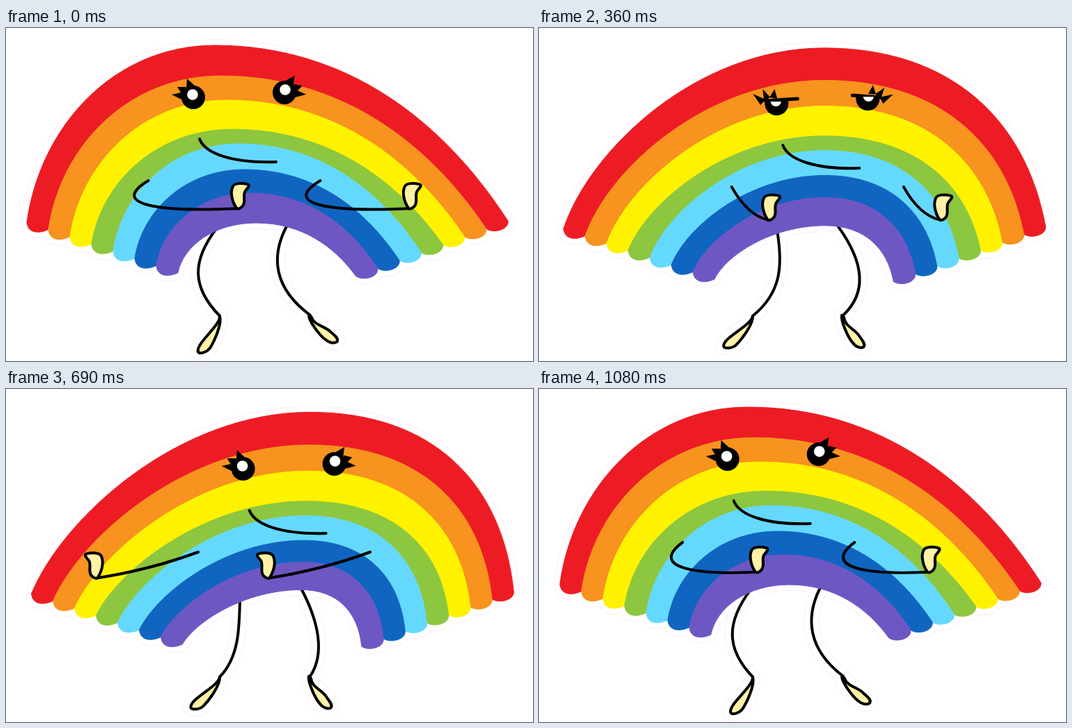
Animation, 757 px wide and 480 px high, one loop 1110 ms. Source, as an HTML page with a canvas:

```html
<!DOCTYPE html>
<html lang="en">
<head>
<meta charset="utf-8">
<title>Dancing rainbow</title>
<style>
  html, body { margin: 0; width: 100%; height: 100%; overflow: hidden; background: #fff; }
  canvas { display: block; width: 757px; height: 480px; }
</style>
</head>
<body>
<canvas id="stage" width="757" height="480"></canvas>
<script>
const ctx = document.getElementById('stage').getContext('2d');
const LOOP = 1110, STEP = 30;
const COLORS = ['#ed1c24', '#f7931e', '#fff200', '#8dc63f', '#65d9fd', '#1065c0', '#6e57c3'];
const CREAM = '#fff2a6';

// Depth of each band edge below the top of the arch
const DEPTH = [0, 44, 79, 121, 142, 179, 213, 256];

// Arm swing: time, sideways reach of the hand, sideways bend of the elbow
const ARM = [
  [0, 127, -88], [210, 181, 0], [360, 52, -2], [570, -150, 0],
  [690, -145, 2], [840, -63, 80], [1080, 105, -72]
];
const FULL_REACH = 181;

const HAND = new Path2D('M0 0C-6-8-10-22-6-31C-4-37 8-37 15-35C20-34 16-30 12-25C8-18 14-9 8-3C5 0 2 1 0 0Z');
const FOOT_L = new Path2D('M0 0C-2 14-41 30-42 43C-41 48-30 47-24 42C-16 34 1 12 0 0Z');
const FOOT_R = new Path2D('M-1 0C-3 8 8 32 14 39C19 46 26 48 30 46C34 42 28 36 24 30C18 20 3 16 2 3Z');
const LASHES = new Path2D('M9-27L10-13L-2-17ZM23-15L16-4L10-15ZM31-4L17 3L13-8Z');
const LASHES_LOW = new Path2D('M34-14L23 2L16-6ZM20-21L18-4L9-9ZM3-21L10-9L-1-7Z');
const SMILE = new Path2D('M0 0C8 21 47 35 110 33');

const mix = (a, b, t) => a + (b - a) * t;
const clamp = (x, lo, hi) => Math.max(lo, Math.min(hi, x));

// Smooth periodic curve through one column of the arm keys
function armValue(column, t) {
  const n = ARM.length;
  const time = i => ARM[(i + n) % n][0] + Math.floor(i / n) * LOOP;
  const value = i => ARM[(i + n) % n][column];
  const slope = i => {
    const h0 = time(i) - time(i - 1), h1 = time(i + 1) - time(i);
    const d0 = (value(i) - value(i - 1)) / h0, d1 = (value(i + 1) - value(i)) / h1;
    return (d0 * h1 + d1 * h0) / (h0 + h1);
  };
  let i = n - 1;
  while (time(i) > t) i--;
  const h = time(i + 1) - time(i), u = (t - time(i)) / h, v = 1 - u;
  return value(i) * (1 + 2 * u) * v * v + value(i + 1) * u * u * (3 - 2 * u)
    + h * u * v * (slope(i) * v - slope(i + 1) * u);
}

function poseAt(t) {
  const half = t / LOOP * 2;
  // The hips ease out both ways; the arch follows on a softer wave
  const lean = half < 1 ? 1 - (1 - half) ** 1.7 : (2 - half) ** 1.35;
  const sway = ((1 - Math.cos(Math.PI * half)) / 2) ** 1.3;
  const drop = 18 * Math.sin(Math.PI * lean);
  return {
    lean, sway, drop,
    top: 25 - 8 * sway + drop,
    face: [278 + 87 * Math.max(lean, sway), 160 + drop],
    foot: -13 * (1 - lean) ** 3,
    reach: armValue(1, t),
    bend: armValue(2, t),
    blink: t >= 330 && t < 450
  };
}

// One band edge: left foot, peak and right foot with their handles
function edge({ sway: s, drop, top }, i) {
  const l = [30 + 31 * i + 8 * s, 280 + 10.4 * i + drop];
  const r = [721 - 31.2 * i + 10 * s, 278 + 11.4 * i + drop - 2 * s];
  const m = [mix(300 + 8.5 * i, 466 - 4 * i, s), top + DEPTH[i] + 9 * s * Math.sin(Math.PI * i / 7)];
  const wl = m[0] - l[0], hl = l[1] - m[1], wr = r[0] - m[0], hr = r[1] - m[1];
  return [
    l,
    [l[0] + wl * mix(.07, .12, s), l[1] - hl * mix(.54, .39, s)],
    [m[0] - wl * mix(.54, .46, s), m[1]],
    m,
    [m[0] + wr * mix(.45, .64, s), m[1]],
    [r[0] - wr * mix(.22, .02, s), r[1] - hr * mix(.57, .61, s)],
    r
  ];
}

function bandPath(a, b) {
  const path = new Path2D();
  const curve = (p, q, r) => path.bezierCurveTo(...p, ...q, ...r);
  const shift = (p, x, y) => [p[0] + x, p[1] + y];
  path.moveTo(...a[0]);
  curve(a[1], a[2], a[3]);
  curve(a[4], a[5], a[6]);
  curve(shift(a[6], 2, 13), shift(b[6], 10, 7), b[6]);
  curve(b[5], b[4], b[3]);
  curve(b[2], b[1], b[0]);
  curve(shift(b[0], -12, 6), shift(a[0], 1, 17), a[0]);
  path.closePath();
  return path;
}

function legPath(hip, c1, c2, ankle) {
  const path = new Path2D();
  path.moveTo(hip[0] - (c1[0] - hip[0]) * .15, hip[1] - 7);
  path.lineTo(...hip);
  path.bezierCurveTo(...c1, ...c2, ...ankle);
  return path;
}

function legs({ lean: k, drop: d, sway }) {
  return [
    legPath([303 + 48 * k, 288 + d], [268 + 98 * k, 334 + d * .8], [265 + 101 * k, 372 + d], [307, 415]),
    legPath([403 + 32 * k, 286 + d - 14 * sway], [381 + 99 * k, 328 + d * .5], [383 + 110 * k, 374 + d * .5], [437, 414])
  ];
}

function placed(path, x, y, angle = 0, scaleX = 1) {
  const out = new Path2D();
  out.addPath(path, new DOMMatrix().translate(x, y).rotate(angle).scale(scaleX, 1));
  return out;
}

function line(path, width, color = '#000') {
  ctx.lineWidth = width;
  ctx.strokeStyle = color;
  ctx.stroke(path);
}

function fill(path, color) {
  ctx.fillStyle = color;
  ctx.fill(path);
}

function outlined(path) {
  fill(path, CREAM);
  line(path, 4);
}

function disc(x, y, r, color) {
  ctx.beginPath();
  ctx.arc(x, y, r, 0, 7);
  ctx.fillStyle = color;
  ctx.fill();
}

function drawEye(x, y, dir, blink) {
  ctx.save();
  ctx.translate(x, y);
  ctx.save();
  if (dir < 0) ctx.scale(-1, 1);
  else ctx.rotate(.22);
  fill(blink ? LASHES_LOW : LASHES, '#000');
  ctx.restore();
  if (blink) {
    line(new Path2D(dir < 0 ? 'M-16-4L30-7' : 'M-22-5L18-2'), 5);
    ctx.beginPath();
    ctx.rect(-20, -5, 40, 30);
    ctx.clip();
  }
  disc(0, 0, 17, '#000');
  disc(dir, -4, 7.8, '#fff');
  if (blink) {
    ctx.fillStyle = '#000';
    ctx.fillRect(-17, -6, 34, 3);
  }
  ctx.restore();
}

function drawArm({ reach, bend }, x, y) {
  const slack = 1 - (reach / FULL_REACH) ** 2;
  const handY = 31 + 18 * slack;
  const sag = 12 * slack + .15 * Math.abs(bend);
  const arm = new Path2D();
  arm.bezierCurveTo(0, 0, 0, 0, 0, 0);
  arm.bezierCurveTo(
    reach / 3 + bend * 1.1, handY / 3 + sag,
    reach * 2 / 3 + bend * .9, handY * 2 / 3 + sag,
    reach, handY
  );
  ctx.save();
  ctx.translate(x, y);
  line(arm, 4);
  outlined(placed(HAND, reach, handY, 0, clamp(reach / 45, -1, 1)));
  ctx.restore();
}

function draw(pose) {
  ctx.fillStyle = '#fff';
  ctx.fillRect(0, 0, 757, 480);
  ctx.lineCap = ctx.lineJoin = 'round';

  const edges = DEPTH.map((_, i) => edge(pose, i));
  const bands = COLORS.map((_, i) => bandPath(edges[i], edges[i + 1]));
  const limbs = legs(pose);
  const feet = [placed(FOOT_L, 307, 415, pose.foot), placed(FOOT_R, 436, 414, pose.foot)];

  // Pale outline around the whole figure
  for (const [extra, color] of [[1.6, '#faeafb'], [0, '#fff']]) {
    for (const band of bands) line(band, 16 + extra, color);
    for (const limb of [...limbs, ...feet]) line(limb, 20 + extra, color);
  }

  limbs.forEach(leg => line(leg, 4));
  feet.forEach(outlined);
  bands.forEach((band, i) => { fill(band, COLORS[i]); line(band, 1, COLORS[i]); });

  const [x, y] = pose.face;
  drawEye(x - 9, y - 60, -1, pose.blink);
  drawEye(x + 122, y - 67, 1, pose.blink);
  line(placed(SMILE, x, y), 4);
  drawArm(pose, x - 73.5, y + 60);
  drawArm(pose, x + 173.5, y + 60);
}

const start = performance.now();
function tick() {
  const t = (performance.now() - start) % LOOP;
  draw(poseAt(Math.floor(t / STEP) * STEP));
  requestAnimationFrame(tick);
}
tick();
</script>
</body>
</html>
```
